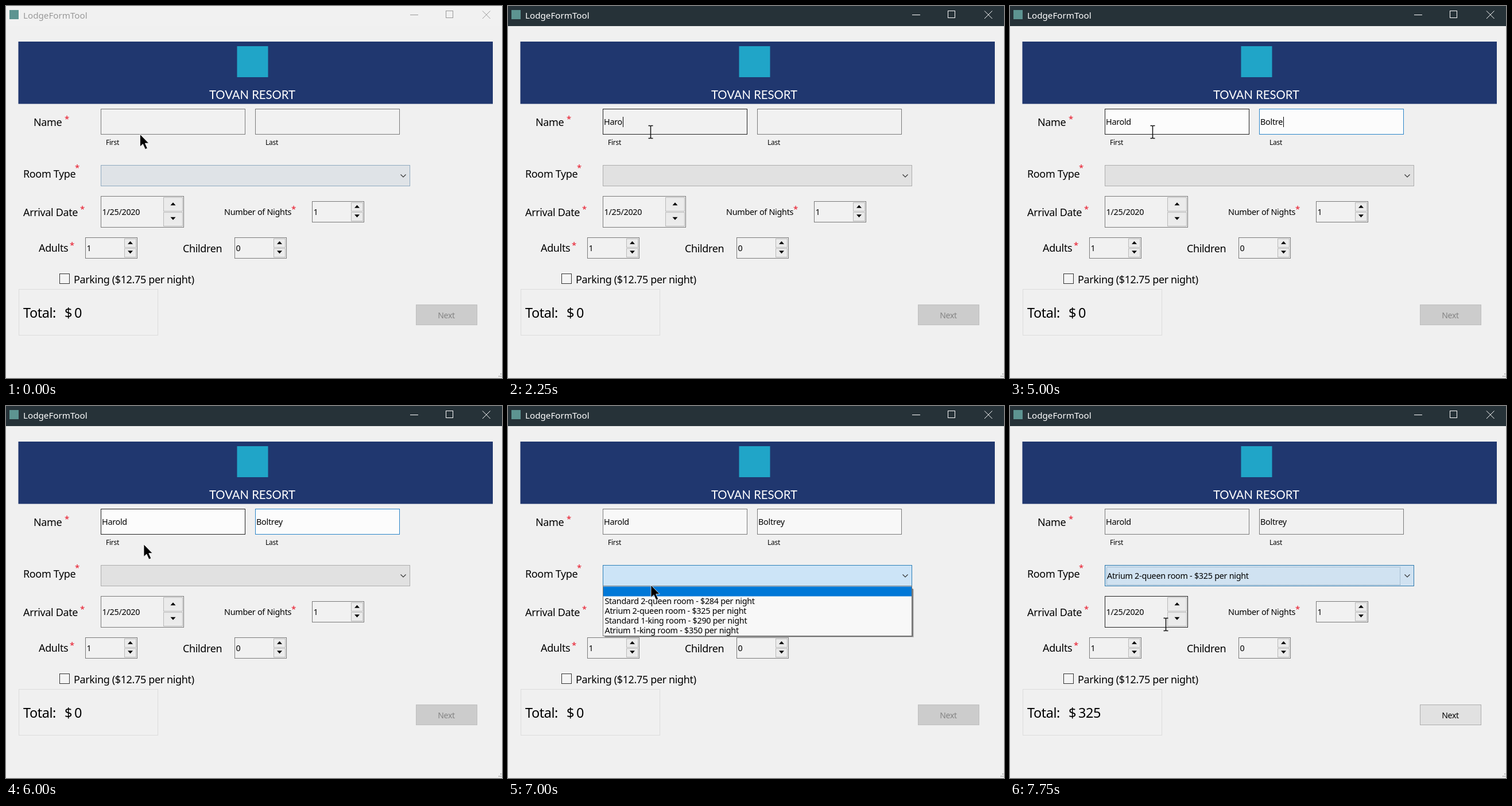
Animation, 864 px wide and 648 px high, one loop 8 s. Source, as an HTML page:

```html
<!DOCTYPE html>
<html lang="en">
<head>
<meta charset="utf-8">
<title>Reservation form</title>
<style>
  html, body { margin: 0; width: 100%; height: 100%; overflow: hidden; background: #f0f0f0; }
  svg { display: block; width: 864px; height: 648px; }
  text { font-family: "Noto Sans", sans-serif; font-size: 14.4px; letter-spacing: -.02em; fill: #000; }
  .label { font-size: 18px; }
  .small { font-size: 12px; }
  .total { font-size: 23.5px; }
  .star { font-size: 15px; fill: #e81123; text-anchor: middle; }
  .brand { font: 20.3px Lato, sans-serif; letter-spacing: 0; fill: #fff; text-anchor: middle; }
  .title { font-size: 15.2px; letter-spacing: 0; }
  .field { fill: #f1f1f1; stroke: #7a7a7a; }
  .btn { fill: #ebebeb; stroke: #b9b9b9; }
  .line { fill: none; stroke: #333; }
  .crisp { shape-rendering: crispEdges; }
  #bar { fill: #f1f1f1; }
  #bar + g text { fill: #999; }
  #bar + g path { stroke: #999; fill: none; }
  .active #bar { fill: #263238; }
  .active #bar + g text { fill: #fff; }
  .active #bar + g path { stroke: #fff; }
  #next rect { fill: #ccc; stroke: #bfbfbf; }
  #next text { fill: #838383; font-size: 14px; text-anchor: middle; }
  .ready #next rect { fill: #e1e1e1; stroke: #adadad; }
  .ready #next text { fill: #000; }
</style>
</head>
<body>
<svg id="app" viewBox="0 0 864 648">
  <defs>
    <clipPath id="below"><rect x="160" y="312" width="560" height="100"/></clipPath>
  </defs>
  <rect width="864" height="648" fill="#f0f0f0"/>

  <rect id="bar" width="864" height="35"/>
  <g>
    <rect x="6" y="7" width="16" height="16" fill="#5d9491"/>
    <text class="title" x="30" y="22">LodgeFormTool</text>
    <path class="crisp" d="M704 15.5H718M766.5 8.5h12v12h-12z"/>
    <path d="M830 8.5L843.5 22M843.5 8.5L830 22"/>
  </g>

  <rect x="21.5" y="62" width="826.5" height="108.5" fill="#20376f"/>
  <rect x="402.5" y="70" width="54" height="54" fill="#20a5c8"/>
  <text class="brand" x="429" y="162">TOVAN RESORT</text>

  <g id="labels"></g>

  <rect id="firstBox" class="field crisp" x="165.5" y="179.5" width="251" height="44"/>
  <rect id="lastBox" class="field crisp" x="434.5" y="179.5" width="251" height="44"/>
  <text id="first" x="167" y="207"></text>
  <text id="last" x="436" y="207"></text>
  <rect id="caret" class="crisp" y="193" width="1" height="18"/>

  <g id="spins"></g>

  <g class="crisp">
    <rect x="93.5" y="466.5" width="17" height="17" fill="#f4f4f4" stroke="#333"/>
    <rect x="22.5" y="493.5" width="242" height="80" fill="none" stroke="#dcdcdc"/>
  </g>
  <text class="total" x="30" y="543">Total:</text>
  <text class="total" x="102" y="543">$</text>
  <text class="total" id="sum" x="119" y="543"></text>

  <g id="next">
    <rect class="crisp" x="714.5" y="520.5" width="106" height="35"/>
    <text x="767" y="544">Next</text>
  </g>
  <path d="M862 640v2M862 644v2M859 644v2" stroke="#b4b4b4" stroke-width="2"/>

  <rect id="combo" class="crisp" x="165.5" y="277.5" width="538" height="36"/>
  <rect id="focus" class="crisp" x="168.5" y="280.5" width="511" height="31" fill="none" stroke-dasharray="1 1"/>
  <path class="line" d="M687.5 293.5l4.5 4.5 4.5-4.5" stroke-width="1.2"/>
  <text id="choice" x="169" y="301"></text>

  <g id="popup">
    <g id="shadow">
      <rect x="169" y="319" width="538" height="84" fill-opacity=".18"/>
      <rect x="168" y="318" width="537.5" height="84" fill-opacity=".45"/>
    </g>
    <g clip-path="url(#below)">
      <g id="list">
        <rect id="sheet" class="crisp" x="165.5" y="313.5" width="538" height="87" stroke="#777"/>
        <rect id="mark" x="166" width="537" height="17" fill="#0078d7"/>
        <g id="rows"></g>
      </g>
    </g>
  </g>

  <path id="arrow" d="M0 0V21.5L4.9 17 9 26 12.8 24.4 8.8 15.6H15.2Z" stroke="#fff" stroke-width=".8"/>
  <path id="beam" class="line" d="M-4-10.5h3l1 1 1-1h3M0-9.5v20M-4 11.5h3l1-1 1 1h3" style="stroke:#111" stroke-width="1.5"/>
</svg>
<script>
const $ = id => document.getElementById(id);
const set = (id, attrs) => { for (const k in attrs) $(id).setAttribute(k, attrs[k]); };
const show = (id, on) => { $(id).style.display = on ? "" : "none"; };

const rooms = ["", "Standard 2-queen room - $284 per night", "Atrium 2-queen room - $325 per night",
  "Standard 1-king room - $290 per night", "Atrium 1-king room - $350 per night"];

const label = (x, y, text, cls = "label") => `<text class="${cls}" x="${x}" y="${y}">${text}</text>`;

$("labels").innerHTML =
  label(48, 209, "Name") + label(30, 299, "Room Type") + label(30, 366, "Arrival Date") +
  label(57, 428, "Adults") + label(308, 429, "Children") +
  label(118, 483, "Parking ($12.75 per night)") +
  label(380, 364, "Number of Nights", "") +
  label(174, 242, "First", "small") + label(452, 242, "Last", "small") +
  [[106, 201.5], [124, 286.5], [133, 358.5], [501, 358.5], [115, 421.5]]
    .map(([x, y]) => label(x, y, "*", "star")).join("");

// Spin box with up and down buttons
function spin(x, y, w, h, bw, value, base, id = "") {
  const bx = x + w - bw - 2, bh = (h - 4) / 2, cx = bx + bw / 2;
  const button = (by, dir) => {
    const cy = by + bh / 2 - 1;
    return `<rect class="btn crisp" x="${bx + .5}" y="${Math.round(by) + .5}" width="${bw - 1}" height="${Math.floor(bh) - 1}"/>
      <path d="M${cx - 4.5} ${cy + 2.5 * dir}h9l-4.5 ${-5 * dir}z"/>`;
  };
  return `<rect ${id && `id="${id}"`} class="field crisp" x="${x + .5}" y="${y + .5}" width="${w - 1}" height="${h - 1}"/>` +
    label(x + 2.5, base, value, "") + button(y + 2, 1) + button(y + 2 + bh, -1);
}

$("spins").innerHTML =
  spin(165, 331, 145, 55, 34, "1/25/2020", 364, "dateBox") +
  spin(533, 340, 91, 37, 21, "1", 364) +
  spin(138, 403, 91, 37, 21, "1", 427) +
  spin(398, 403, 91, 37, 21, "0", 427);

$("rows").innerHTML = rooms.map((r, i) => `<text x="168.5" y="${328 + 17 * i}">${r}</text>`).join("");

const GRAY = "#7a7a7a", DARK = "#222", BLUE = "#2a84c8";

// Each step changes only what it names
const steps = [
  [0, { active: false, first: "", last: "", caret: "", firstLine: GRAY, lastLine: GRAY, paper: "#f1f1f1",
        combo: ["#dfe3e7", "#8fa9bf"], focus: "", pick: 0, hot: -1, slide: null, dateLine: GRAY,
        arrow: [233.5, 223.5], beam: null }],
  [250, { arrow: null, beam: [246, 217], firstLine: "#444", combo: ["#e0e2e4", "#9fabb6"] }],
  [500, { beam: [248.5, 219], firstLine: DARK, combo: ["#e1e1e1", "#adadad"] }],
  [750, { active: true, caret: "first" }],
  [1250, { first: "H" }],
  [1750, { first: "Ha" }],
  [2000, { first: "Har" }],
  [2250, { first: "Haro" }],
  [2500, { first: "Harold" }],
  [3000, { caret: "last", lastLine: BLUE, paper: "#fcfcfc" }],
  [3500, { last: "B" }],
  [3750, { last: "Bo" }],
  [4250, { last: "Bol" }],
  [4750, { last: "Boltr" }],
  [5000, { last: "Boltre" }],
  [5500, { last: "Boltrey" }],
  [6000, { caret: "", beam: null, arrow: [240, 241] }],
  [6250, { arrow: [246, 285], firstLine: GRAY, lastLine: GRAY, paper: "#f8f8f8",
           combo: ["#e3eff9", BLUE], focus: "#222" }],
  [6500, { arrow: [249, 303] }],
  [6750, { slide: -47.5 }],
  [7000, { slide: 0, hot: 0, focus: "", combo: ["#cce4f7", "#2c7fb8"], arrow: [249, 312] }],
  [7250, { hot: 1, arrow: [249, 334] }],
  [7500, { hot: 2, arrow: [249.5, 349], paper: "#f1f1f1" }],
  [7750, { slide: null, hot: -1, pick: 2, combo: ["#d0e2f1", "#2c78ac"], focus: "#7f9db5",
           arrow: null, beam: [271.5, 380], dateLine: DARK }]
];

function pointer(id, at) {
  show(id, at);
  if (at) set(id, { transform: `translate(${at})` });
}

function render(s) {
  $("app").classList.toggle("active", s.active);
  $("app").classList.toggle("ready", s.pick > 0);
  for (const name of ["first", "last"]) {
    $(name).textContent = s[name];
    $(name + "Box").style.fill = s.paper;
    $(name + "Box").style.stroke = s[name + "Line"];
  }
  show("caret", s.caret);
  if (s.caret) {
    const el = $(s.caret);
    const width = s[s.caret] ? el.getComputedTextLength() : 0;
    set("caret", { x: Math.round(+el.getAttribute("x") + 1 + width) });
  }
  $("dateBox").style.stroke = s.dateLine;
  set("combo", { fill: s.combo[0], stroke: s.combo[1] });
  set("focus", { stroke: s.focus || "none" });
  $("choice").textContent = rooms[s.pick];
  $("sum").textContent = s.pick ? "325" : "0";

  show("popup", s.slide !== null);
  show("shadow", s.slide === 0);
  set("list", { transform: `translate(0 ${s.slide || 0})` });
  set("sheet", { fill: s.paper === "#f8f8f8" ? "#f8f8f8" : "#f3f3f3" });
  show("mark", s.hot >= 0);
  set("mark", { y: 314.5 + 17 * Math.max(s.hot, 0) });
  [...$("rows").children].forEach((row, i) => { row.style.fill = i === s.hot ? "#fff" : "#000"; });

  pointer("arrow", s.arrow);
  pointer("beam", s.beam);
}

let shown = -1;
function tick() {
  const t = performance.now() % 8000;
  const index = steps.filter(([start]) => start <= t).length - 1;
  if (index !== shown) {
    shown = index;
    render(Object.assign({}, ...steps.slice(0, index + 1).map(step => step[1])));
  }
  requestAnimationFrame(tick);
}
tick();
</script>
</body>
</html>
```
